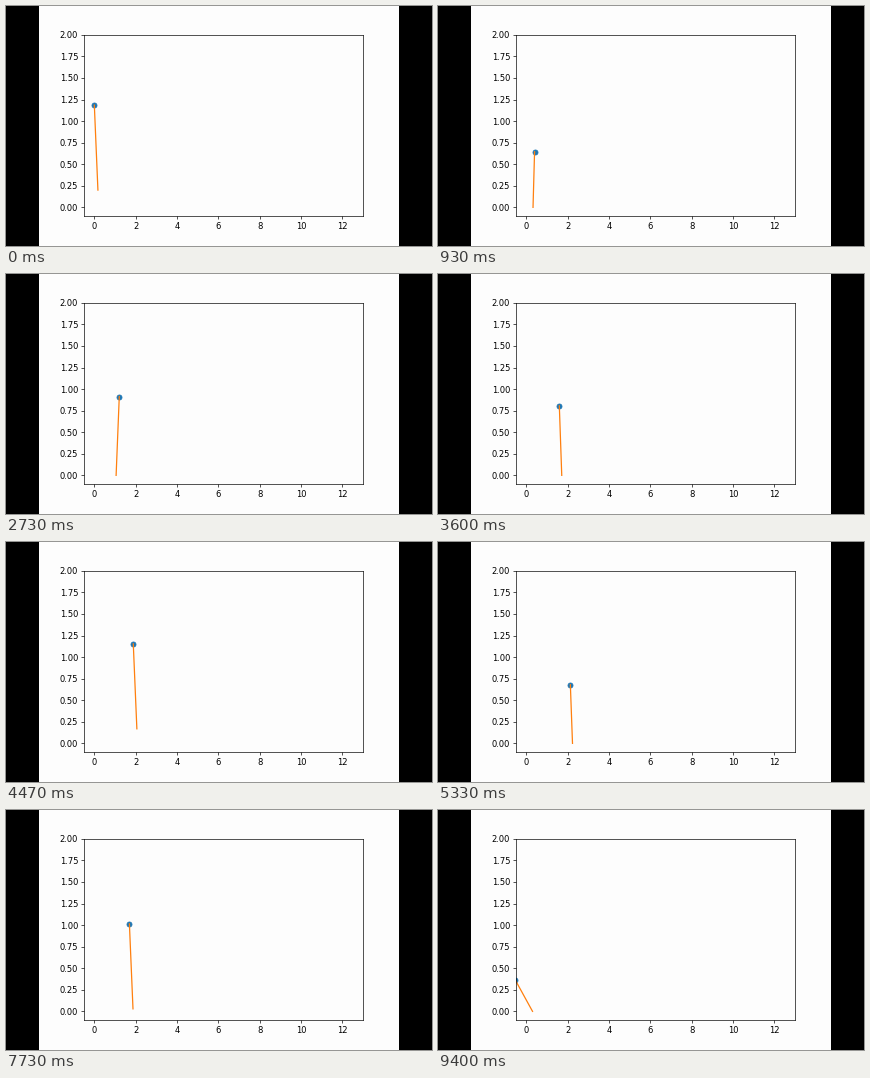
Write a matplotlib script that moves like this. It is 426 px wide and 240 px high and loops after 9470 ms.

```python
import math

import matplotlib.pyplot as plt
from matplotlib.animation import FuncAnimation
from matplotlib.patches import Rectangle

WIDTH, HEIGHT, DPI = 426, 240, 60
LOOP_MS, FRAMES = 9470, 142
PAPER = "#fdfdfd"

# Spring-legged hopper: ballistic flight, then a springy stance on a fixed foot.
GRAVITY = 3.7
LEG_ANGLE = math.radians(10)
REACH, LEG_HEIGHT = math.sin(LEG_ANGLE), math.cos(LEG_ANGLE)
START_X, START_Y = 0.0, 1.185
FINAL_SPEED = -2.3

# Each stance: landing time, lift-off time, x at both, y at lift-off, squash depth.
STANCES = [
    (0.29, 1.15, 0.15, 0.53, LEG_HEIGHT, 0.395),
    (1.81, 2.72, 0.88, 1.23, LEG_HEIGHT, 0.395),
    (3.40, 4.30, 1.54, 1.83, LEG_HEIGHT, 0.395),
    (5.01, 5.93, 2.06, 2.20, LEG_HEIGHT, 0.395),
    (6.53, 7.28, 2.20, 1.98, 0.92, 0.395),
    (7.72, 8.42, 1.66, 1.13, 0.71, 0.36),
    (9.00, 9.40, 0.126, -0.67, 0.243, 0.0),
]


def lerp(a, b, u):
    return a + (b - a) * u


def hermite(a, b, slope_a, slope_b, u):
    return ((2 * u**3 - 3 * u**2 + 1) * a + (u**3 - 2 * u**2 + u) * slope_a
            + (3 * u**2 - 2 * u**3) * b + (u**3 - u**2) * slope_b)


def flight_speeds():
    """Horizontal speed of the flight before each stance, plus the last one."""
    speeds, t, x = [], 0.0, START_X
    for down, up, x_down, x_up, _, _ in STANCES:
        speeds.append((x_down - x) / (down - t))
        t, x = up, x_up
    return speeds + [FINAL_SPEED]


SPEEDS = flight_speeds()


def pose(t):
    """Return mass x, mass y, foot x, foot y at time t in seconds."""
    t = min(t, STANCES[-1][1])
    t_prev, x_prev, y_prev = 0.0, START_X, START_Y
    for i, (down, up, x_down, x_up, y_up, depth) in enumerate(STANCES):
        if t < down:
            u = (t - t_prev) / (down - t_prev)
            x = lerp(x_prev, x_down, u)
            y = lerp(y_prev, LEG_HEIGHT, u) + GRAVITY / 2 * (t - t_prev) * (down - t)
            return x, y, x + REACH, y - LEG_HEIGHT
        if t <= up:
            span = up - down
            u = (t - down) / span
            x = hermite(x_down, x_up, SPEEDS[i] * span, SPEEDS[i + 1] * span, u)
            y = lerp(LEG_HEIGHT, y_up, u) - depth * math.sin(math.pi * u)
            return x, y, x_down + REACH, 0.0
        t_prev, x_prev, y_prev = up, x_up, y_up


fig = plt.figure(figsize=(WIDTH / DPI, HEIGHT / DPI), dpi=DPI, facecolor="black")
fig.add_artist(Rectangle((33 / WIDTH, 0), 360 / WIDTH, 1,
                         transform=fig.transFigure, color=PAPER, lw=0, zorder=-1))
ax = fig.add_axes([78 / WIDTH, 0.125, 279 / WIDTH, 0.755], facecolor=PAPER)
ax.set_xlim(-0.5, 13)
ax.set_ylim(-0.1, 2)
ax.set_xticks(range(0, 13, 2))
ax.set_yticks([i * 0.25 for i in range(9)])
ax.yaxis.set_major_formatter("{x:.2f}")

mass, = ax.plot([], [], "o", color="C0")
leg, = ax.plot([], [], color="C1")


def update(frame):
    x, y, foot_x, foot_y = pose(frame * LOOP_MS / FRAMES / 1000)
    mass.set_data([x], [y])
    leg.set_data([x, foot_x], [y, foot_y])
    return mass, leg


anim = FuncAnimation(fig, update, frames=FRAMES, interval=LOOP_MS / FRAMES,
                     repeat=True, repeat_delay=0)
plt.show()
```
